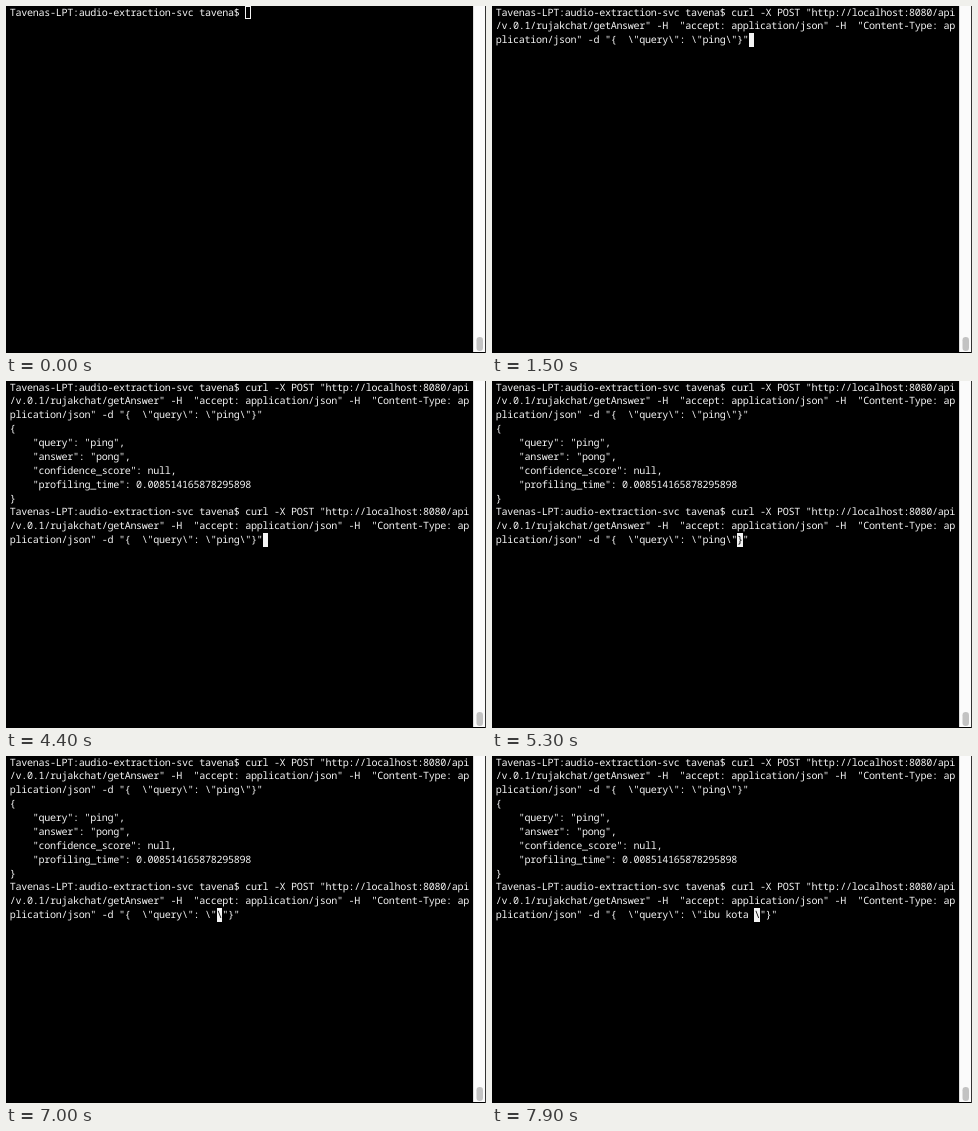
Recreate the animation shown at these times as an HTML page with a canvas. Size 480x347 px, loop 8000 ms.

```html
<!DOCTYPE html>
<html lang="en">
<head>
<meta charset="utf-8">
<title>Terminal session</title>
<style>
  html, body { margin: 0; width: 100%; height: 100%; overflow: hidden; background: #000; }
  canvas { display: block; width: 480px; height: 347px; }
</style>
</head>
<body>
<canvas id="stage" width="480" height="347"></canvas>
<script>
const ctx = document.getElementById("stage").getContext("2d");
const LOOP = 8000, COLS = 80, W = 480, H = 347;
const LEFT = 4, TOP = -0.5, CELL_W = 5.74, CELL_H = 13.87, BASE = 10.1;
const INK = "#f4f4f4";
const FONT = '500 10.1px "Noto Sans Mono", "DejaVu Sans Mono", monospace';

const PROMPT = "Tavenas-LPT:audio-extraction-svc tavena$ ";
const REPLY = [
  "{",
  '    "query": "ping",',
  '    "answer": "pong",',
  '    "confidence_score": null,',
  '    "profiling_time": 0.008514165878295898',
  "}"
];

const command = query =>
  'curl -X POST "http://localhost:8080/api/v.0.1/rujakchat/getAnswer"' +
  ' -H  "accept: application/json" -H  "Content-Type: application/json"' +
  ` -d "{  \\"query\\": \\"${query}\\"}"`;

const stepsSince = (t, start) => Math.floor((t - start) / 100) + 1;

// Text of the edited query: erase "ping", then type the new words
function queryAt(t) {
  if (t < 6200) return "ping";
  if (t < 7000) return "ping".slice(0, 4 - Math.min(3, stepsSince(t, 6200)));
  if (t < 7100) return "";
  if (t < 7300) return "i";
  return "ibu kota ".slice(0, 2 + stepsSince(t, 7300));
}

// Number of characters between the cursor and the end of the line
function cursorBack(t) {
  if (t < 4800) return 0;
  if (t < 5300) return 1;
  return Math.min(4, 1 + stepsSince(t, 5300));
}

function wrap(text) {
  const rows = [];
  for (let i = 0; i < text.length; i += COLS) rows.push(text.slice(i, i + COLS));
  return rows;
}

function screenAt(t) {
  let done = [], input = PROMPT;
  if (t >= 1500) input += command("ping");
  if (t >= 3500) {
    done = [...wrap(input), ...REPLY];
    input = t < 3700 ? "" : PROMPT;
    if (t >= 4400) input += command(queryAt(t));
  }
  const at = input.length - cursorBack(t);
  return {
    rows: [...done, ...wrap(input)],
    row: done.length + Math.floor(at / COLS),
    col: at % COLS
  };
}

function box(x, y, w, h, color) {
  ctx.fillStyle = color;
  ctx.fillRect(x, y, w, h);
}

function drawChar(ch, row, col, color) {
  if (!ch || ch === " ") return;
  ctx.fillStyle = color;
  ctx.fillText(ch, LEFT + (col + 0.5) * CELL_W, TOP + row * CELL_H + BASE);
}

// The cursor block is snapped to whole pixels
function drawCursor({ rows, row, col }, hollow) {
  const x = Math.round(LEFT + col * CELL_W);
  const y = Math.round(TOP + row * CELL_H);
  const w = Math.round(LEFT + (col + 1) * CELL_W) - x;
  const h = Math.round(TOP + (row + 1) * CELL_H) - y;
  box(x, y, w, h, INK);
  if (hollow) box(x + 1, y + 1, w - 2, h - 2, "#000");
  else drawChar((rows[row] || "")[col], row, col, "#000");
}

function drawScrollbar() {
  box(467, 0, 12, H - 1, "#fbfbfb");
  box(467, 0, 1, H - 1, "#dedede");
  box(W - 1, 0, 1, H, "#333");
  ctx.fillStyle = "#c3c3c3";
  ctx.beginPath();
  ctx.roundRect(470.5, 331, 6.5, 14, 3.2);
  ctx.fill();
}

function draw(t) {
  box(0, 0, W, H, "#000");
  ctx.font = FONT;
  ctx.textAlign = "center";
  ctx.textRendering = "geometricPrecision";
  const screen = screenAt(t);
  screen.rows.forEach((line, row) => {
    [...line].forEach((ch, col) => drawChar(ch, row, col, INK));
  });
  drawCursor(screen, t < 700);
  drawScrollbar();
}

function tick() {
  draw(performance.now() % LOOP);
  requestAnimationFrame(tick);
}
tick();
</script>
</body>
</html>
```
